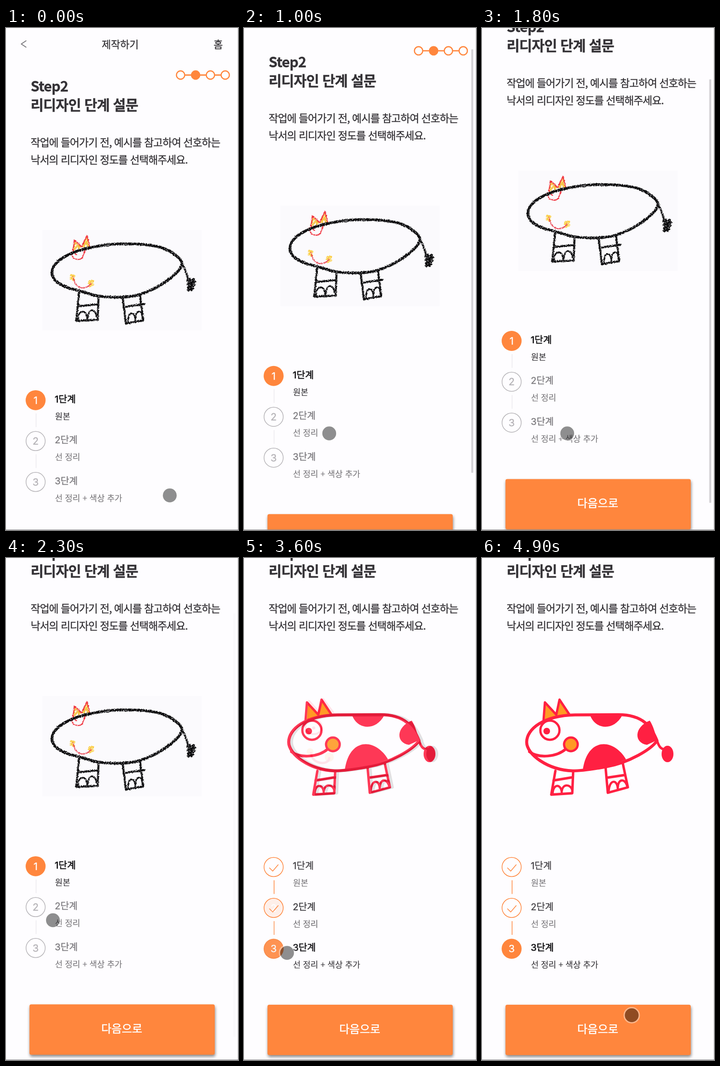
An HTML page that plays this animation: 509 by 1099 pixels, repeating every 5 s.

```html
<!DOCTYPE html>
<html lang="ko">
<head>
<meta charset="utf-8">
<style>
  html, body { margin: 0; width: 100%; height: 100%; overflow: hidden; background: #fefdff; }
  svg { display: block; width: 100%; height: 100%; }
  text {
    font-family: "Noto Sans CJK KR", "Noto Sans CJK", sans-serif;
    color: #343236; fill: currentColor; stroke: currentColor; stroke-width: .35;
  }
  .heading { font-size: 31px; font-weight: 700; letter-spacing: -1px; }
  .lead { font-size: 23px; letter-spacing: -1px; }
  .bar { font-size: 22px; }
  .digit, .name { font-family: Inter, "Noto Sans CJK KR", "Noto Sans CJK", sans-serif; }
  .digit { font-size: 22px; text-anchor: middle; }
  .name { font-size: 20.5px; }
  .note { font-size: 18.2px; stroke-width: .2; }
  .active { stroke-width: .7; }
  .button rect { fill: #ff863d; filter: drop-shadow(1px 4px 3px #0007); }
  .label { font-size: 24.4px; text-anchor: middle; stroke-width: .6; }
  .line { fill: none; stroke-linecap: round; stroke-linejoin: round; }
</style>
</head>
<body>
<svg id="stage" viewBox="0 0 509 1099"></svg>
<script>
const ORANGE = '#ff863d', RED = '#ff2042', AMBER = '#ff9a24', PAPER = '#fefdff', GREY = '#b5b3b7';
const DURATION = 5000;

const line = (d, color, width, fill = 'none') =>
  `<path class="line" d="${d}" stroke="${color}" stroke-width="${width}" style="fill:${fill}"/>`;
const circle = (x, y, r, fill, stroke = 'none', width = 0) =>
  `<circle cx="${x}" cy="${y}" r="${r}" fill="${fill}" stroke="${stroke}" stroke-width="${width}"/>`;
const text = (x, y, cls, content, color = '') =>
  `<text x="${x}" y="${y}" class="${cls}" style="${color && 'color:' + color}">${content}</text>`;

// Drawing in crayon
const crayonAnimal = () => `
  <rect x="80" y="442" width="349" height="220" fill="#fbfafd"/>
  <g filter="url(#crayon)">
    ${line('M148 486l3-18 12 12M168 478l9-19 5 20M152 484l6-12 2 11M171 478l5-12 3 11', '#f6c443', 4)}
    ${line('M143 541l6 2-7 5 7 3M183 555l8-1-9 5 9 2-7 4', '#fbd04e', 5)}
    ${line('M147 488L150 464 166 479 178 454 184 481M143 491L147 503Q160 511 168 502L174 485M152 494l2 2', '#f0303c', 2.6)}
    ${line('M147 545Q151 565 165 569 182 569 187 558', '#e83a48', 2.2)}
    ${line('M101 535C102 508 145 487 200 478 230 472 290 469 335 479 365 487 388 507 386 518 380 537 340 568 295 583 260 593 210 590 185 583 165 575 140 572 125 564 109 556 100 546 101 535Z', '#0c0c0e', 6)}
    ${line('M386 516Q397 533 400 556', '#0c0c0e', 4.4)}
    ${line('M398 554l15-3-15 10 17-5-16 12 15-5-16 11 13-4M403 549l-2 26M411 550l-4 24', '#0c0c0e', 4.4)}
    ${line('M161 575L154 641 201 639 203 588M158 609L202 605M256 590L263 647 301 640 294 585M258 611L304 604', '#0c0c0e', 4.5)}
    ${line('M158 638C158 616 178 614 178 638M180 635C179 613 197 613 198 632M268 645C266 618 284 618 284 643M284 638C284 614 300 616 299 637', '#0c0c0e', 3.2)}
  </g>`;

const bodyPath = 'M104 403C104 375 140 345 210 343.5L305 343C360 343 378 370 390 400 378 418 330 448 278 457 250 462 225 466 205 466 150 464 104 430 104 403Z';

// Legs and tail are shared by both clean versions
const limbs = color => `
  ${line('M167 466L158 518 204 515 206 468M163 487L205 480M277 457L282 514 326 502 315 450M280 481L320 475', color, 5.4)}
  ${line('M161 516C162 493 180 494 181 514M181 511C183 493 200 495 204 508M284 512C284 486 303 481 304 507M304 505C303 482 321 481 325 502', color, 4.8)}
  ${line('M390 400C394 412 398 419 408 419', color, 5.5)}
  <ellipse cx="413" cy="429" rx="13" ry="18" fill="${color}"/>`;

const cleanAnimal = () => `<g transform="translate(0 140)">
  ${line('M141 356L142.500 313 165 338 174 309 200 344', RED, 4.6, AMBER)}
  ${line(bodyPath, 'none', 0, PAPER)}
  <ellipse cx="153" cy="370" rx="18" ry="15.500" fill="none" stroke="${RED}" stroke-width="4"/>
  ${circle(153, 372, 3.5, RED)}
  ${circle(145, 424, 7.5, '#ffb960')}${circle(187, 436, 10, '#ffb960')}
  ${line('M147 427C148 452 186 455 187 438', RED, 5)}
  ${limbs('#000')}
  ${line(bodyPath, '#000', 7)}</g>`;

const colorAnimal = () => `<g transform="translate(0 140)">
  ${line('M135 355L138 316 163 343 170 310 192 343', RED, 5, AMBER)}
  <g transform="translate(-6 0)">${line(bodyPath, 'none', 0, PAPER)}${limbs(RED)}${line(bodyPath, RED, 6.6)}</g>
  ${line('M237 344C250 378 290 378 308 344Z', RED, 0, RED)}
  ${line('M368 356C333 370 333 405 362 409L384 399C380 383 375 366 368 356Z', RED, 0, RED)}
  ${line('M221 465C230 393 288 393 316 441L272 458Z', RED, 0, RED)}
  ${circle(149, 377, 21, PAPER, RED, 5)}${circle(142, 379, 7.3, RED)}
  ${line('M104 424C125 440 165 435 184 418', RED, 6)}
  ${circle(195, 408, 15, AMBER, RED, 5)}</g>`;

const notes = ['원본', '선 정리', '선 정리 + 색상 추가'];

function step(index, current) {
  const y = 814.8 + index * 89.5;
  const active = index === current, done = index < current;
  const badge = active
    ? circle(65, y, 21.9, ORANGE) + text(65, y + 8, 'digit', index + 1, '#fff')
    : done
      ? circle(65, y, 21, 'none', ORANGE, 1.5) + line(`M56 ${y + 2}l7 7 12-14`, ORANGE, 1.6)
      : circle(65, y, 21, 'none', GREY, 1.5) + text(65, y + 8, 'digit', index + 1, GREY);
  const link = index < 2
    ? `<path d="M66 ${y + 29}v30" stroke="${done ? ORANGE : '#ebe9ee'}" stroke-width="1.5"/>` : '';
  return badge + link
    + text(107, y + 5, active ? 'name active' : 'name', `${index + 1}단계`, active ? '#19181b' : done ? '#454347' : '#7d7b7f')
    + text(107.5, y + 42, 'note', notes[index], active ? '#3b393d' : '#7d7b7f');
}

const progress = () => line('M393 103H439M458 103H471', ORANGE, 2.8)
  + [383, 416, 448.5, 481].map((x, i) => circle(x, 103, 9.1, i === 1 ? ORANGE : PAPER, ORANGE, 2.6)).join('');

const animals = [crayonAnimal, cleanAnimal, colorAnimal];

const page = current => `<g class="page">
  <rect width="509" height="1300" fill="${PAPER}"/>
  ${line('M44 28L33.500 35 44 42', '#757378', 1.8)}
  ${text(210, 44, 'bar', '제작하기')}${text(455.5, 44, 'bar', '홈')}
  ${progress()}
  ${text(54, 139, 'heading', 'Step2')}${text(54, 180, 'heading', '리디자인 단계 설문')}
  ${text(54, 259, 'lead', '작업에 들어가기 전, 예시를 참고하여 선호하는')}
  ${text(54, 297, 'lead', '낙서의 리디자인 정도를 선택해주세요.')}
  ${animals[current]()}
  <g transform="translate(0 ${current ? 1.7 : 0})">${[0, 1, 2].map(i => step(i, current)).join('')}</g>
  <g class="button" transform="translate(0 ${current ? .8 : 0})">
    <rect x="51.500" y="1117.200" width="406.500" height="110.300" rx="4"/>
    ${text(254, 1179, 'label', '다음으로', '#fff')}
  </g></g>`;

const stage = document.getElementById('stage');
stage.innerHTML = `
  <defs><filter id="crayon" filterUnits="userSpaceOnUse" x="80" y="440" width="350" height="225" color-interpolation-filters="sRGB">
    <feTurbulence type="fractalNoise" baseFrequency=".4" numOctaves="2" seed="4" result="grain"/>
    <feDisplacementMap in="SourceGraphic" in2="grain" scale="4" xChannelSelector="R" yChannelSelector="G" result="rough"/>
    <feColorMatrix in="grain" values="0 0 0 0 0  0 0 0 0 0  0 0 0 0 0  0 0 0 6 -1.5" result="holes"/>
    <feComposite in="rough" in2="holes" operator="in"/>
  </filter></defs>
  <g id="scroller">${[0, 1, 2].map(page).join('')}</g>
  <rect id="scrollbar" x="498.500" width="4.500" height="927" rx="1" fill="#d4d2d6"/>
  <path d="M508.500 0V1099" stroke="#dcdade"/><path d="M0 1098.500H509" stroke="#8b898d"/>
  <g id="pointer">${circle(0, 0, 16.5, 'none', '#fff6', 3)}${circle(0, 0, 15.2, '#00000070')}</g>`;

const [scroller, scrollbar, pointer] = ['scroller', 'scrollbar', 'pointer'].map(id => document.getElementById(id));
const pages = [...document.querySelectorAll('.page')];

const linear = k => k;
const smooth = k => k * k * (3 - 2 * k);
const easeOut = k => 1 - (1 - k) ** 2;

// Keys are [time, value, value, ...]
function track(keys, t, ease = linear) {
  const next = keys.findIndex(key => key[0] > t);
  if (next < 0) return keys[keys.length - 1].slice(1);
  if (next === 0) return keys[0].slice(1);
  const [a, b] = [keys[next - 1], keys[next]];
  const k = ease((t - a[0]) / (b[0] - a[0]));
  return a.slice(1).map((v, i) => v + (b[i + 1] - v) * k);
}

const scrollKeys = [[650, 0], [1000, 53], [1600, 88], [1850, 140]];
const barKeys = [[650, 0], [750, 1], [2050, 1], [2330, 0]];
const pointerKeys = [
  [100, 359.3, 1023.3], [650, 187, 887.5], [1850, 187, 887.5], [2300, 103, 793], [2400, 95, 785],
  [2700, 95, 785], [3000, 95.3, 820.5], [3250, 90, 862], [3550, 90, 862], [4100, 272.6, 968], [4500, 328.5, 1001]
];
const dissolves = [[0, 1], [2370, 300], [3400, 300]];

function draw(t) {
  const [scroll] = track(scrollKeys, t);
  const [x, y] = track(pointerKeys, t, smooth);
  scroller.setAttribute('transform', `translate(0 ${-scroll})`);
  scrollbar.setAttribute('y', 1.5 + scroll * .855);
  scrollbar.setAttribute('opacity', track(barKeys, t)[0]);
  pointer.setAttribute('transform', `translate(${x} ${y})`);
  pages.forEach((el, i) => {
    const [start, length] = dissolves[i];
    const k = Math.min(1, Math.max(0, (t - start) / length));
    el.setAttribute('opacity', i ? easeOut(k) : 1);
  });
}

const begin = performance.now();
function tick() {
  draw((performance.now() - begin) % DURATION);
  requestAnimationFrame(tick);
}
tick();
</script>
</body>
</html>
```
